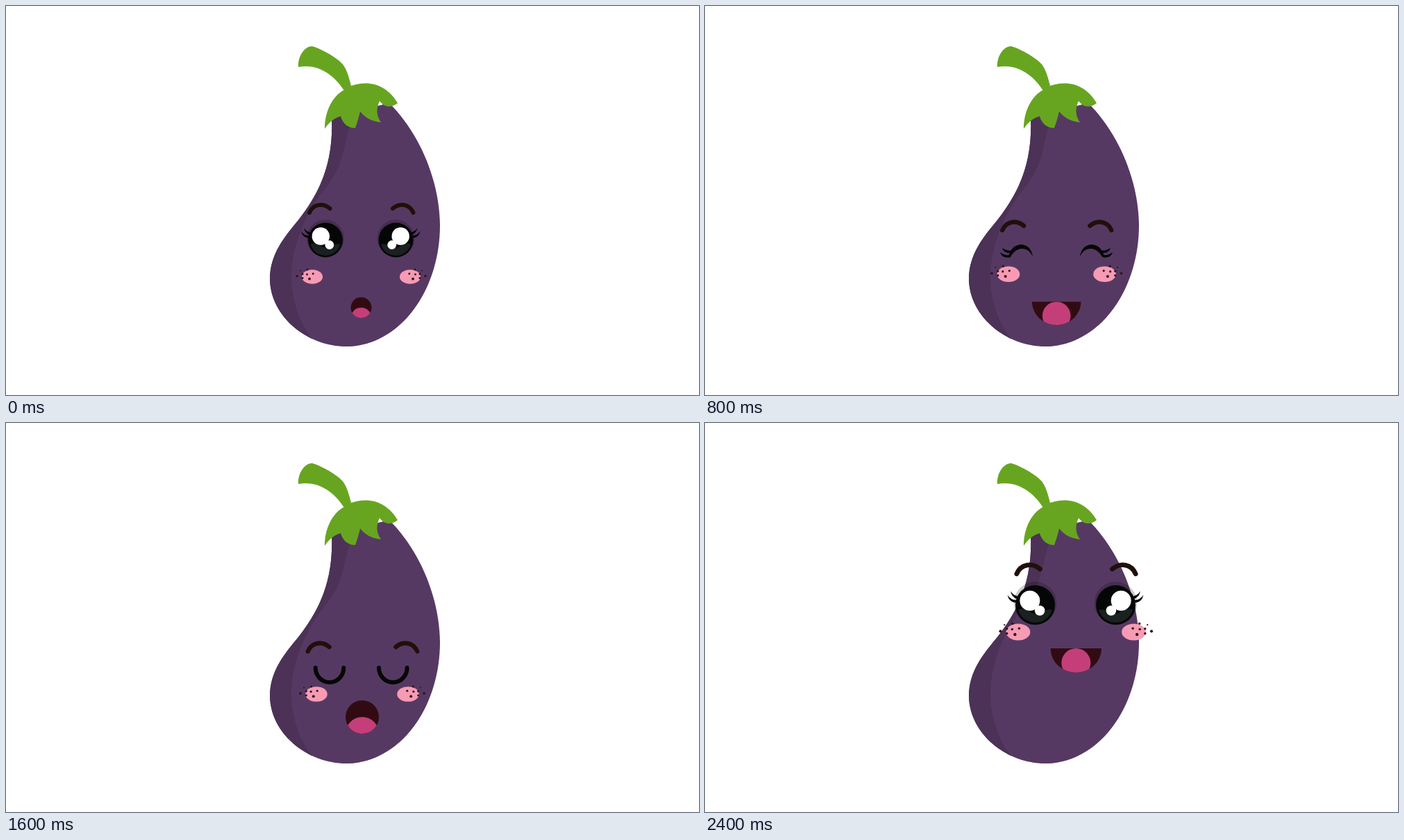
An HTML page for the animation above (2.8 s loop, 998 px wide and 561 px high).

```html
<!DOCTYPE html>
<html lang="en">
<head>
<meta charset="utf-8">
<title>Aubergine faces</title>
<style>
  html, body { margin: 0; width: 100%; height: 100%; overflow: hidden; background: #fff; }
  svg { display: block; width: 100%; height: 100%; }
</style>
</head>
<body>
<svg viewBox="0 0 998 561">
  <defs>
    <path id="body" d="M469 160C472 225 453 268 420 310C401 333 380 358 380 394C381 448 434 491 490 491C566 491 625 412 625 316C624 248 594 182 552 140Z"/>
    <clipPath id="bodyClip"><use href="#body"/></clipPath>

    <g id="lashes">
      <path id="lash" d="M-35 -13Q-33 -2 -21 -3L-22 -6Q-31 -6 -35 -13Z"/>
      <use href="#lash" x="4" y="-4.5"/>
    </g>
    <g id="eye">
      <circle cy="-2.5" r="27" opacity=".2"/>
      <use href="#lashes"/>
      <circle r="25" fill="#050706"/>
      <path d="M-21.5 6C-12 2 -8 10 0 11C8 13 12 4 21.5 6A22.3 22.3 0 0 1 -21.5 6Z" fill="#1b2021"/>
      <g fill="#fff"><circle cx="-6.7" cy="-5.5" r="12.7"/><circle cx="5.8" cy="7" r="6.4"/></g>
    </g>
    <g id="roundEye">
      <circle cx="1" cy="-5" r="32.5" opacity=".2"/>
      <use href="#lashes" transform="scale(1.22)"/>
      <circle r="31" fill="#050706"/>
      <path d="M-24 7C-15 4 -9 14 0 14C9 14 15 4 24 7C25 20 13 26 0 26C-13 26 -25 20 -24 7Z" fill="#1b2021"/>
      <g fill="#fff"><circle cx="-12.5" cy="-10.5" r="12"/><circle cx="4" cy="-6.5" r="3"/></g>
    </g>
    <g id="smileEye" fill="#050706">
      <path d="M-18 9C-14 -15 15 -15 17 9C11 -7 -7 -7 -15 9Z"/>
      <path id="smileLash" d="M-30 2Q-28 11 -16 9.500L-15 6Q-25 7 -30 2Z"/>
      <use href="#smileLash" x="3" y="-6.500"/>
    </g>
    <path id="sleepEye" d="M-20.300 0A20.300 21 0 0 0 20.300 0" fill="none" stroke="#050706" stroke-width="6" stroke-linecap="round"/>
    <path id="brow" d="M-15 7C-10 -5 4 -8 14.500 1" fill="none" stroke="#20100c" stroke-width="6" stroke-linecap="round"/>
    <g id="cheek">
      <ellipse rx="15" ry="10.300" fill="#f79bb4"/>
      <g fill="#33141c">
        <circle cx="-22" cy="-1" r="1.800"/><circle cx="-17" cy="-9" r="1"/>
        <circle cx="-7" cy="-10.500" r="1.500"/><circle cx="-14" cy="-4" r="1.500"/>
        <circle cx="-7.500" cy="-3.500" r="1.500"/><circle cx="1.200" cy="-4.500" r="1.500"/>
        <circle cx="-14" cy="1.700" r="1.500"/><circle cx="-4" cy="3" r="1.900"/>
      </g>
    </g>
  </defs>

  <use href="#body" fill="#563963"/>
  <path clip-path="url(#bodyClip)" fill="#4c3256" d="M497 150V170C484 202 490 226 459 264C432 298 411 345 411 392C412 426 422 456 441 480V500H370V150Z"/>
  <g fill="#67a520">
    <path d="M421 88C420 74 429 58 441 58C452 61 475 73 485 84C491 92 494 103 497 115L487 122C475 103 452 82 421 88Z"/>
    <path d="M459 177C459 152 470 130 487 121Q492 117 497 115C525 106 549 115 564 140C557 146 546 148 538 137C533 148 533 158 540 168C526 166 517 161 510 152Q508 162 503 176C493 176 485 170 482 159C473 161 465 168 459 177Z"/>
  </g>
  <g id="faces"></g>
</svg>
<script>
const STEP = 400;
const ORDER = [0, 1, 2, 0, 3, 4, 5];

const place = (part, x, y, scale = 1, side = 1) =>
  `<use href="#${part}" transform="translate(${x} ${y}) scale(${scale * side} ${scale})"/>`;

// The right part is the left one mirrored.
const pair = (part, left, right, y, scale = 1) =>
  place(part, left, y, scale) + place(part, right, y, scale, -1);

let mouthCount = 0;
function mouth(shape, x, y, rx, ry = rx) {
  const id = `mouth${mouthCount++}`;
  return `<clipPath id="${id}"><path d="${shape}"/></clipPath>
    <path d="${shape}" fill="#320b12"/>
    <ellipse cx="${x}" cy="${y}" rx="${rx}" ry="${ry}" fill="#c43f7a" clip-path="url(#${id})"/>`;
}

const roundMouth = (x, y, r) =>
  mouth(`M${x - r} ${y}a${r} ${r} 0 0 1 ${2 * r} 0a${r} ${r} 0 0 1 ${-2 * r} 0Z`, x, y + r, r);

const grin = (x, y, rx, ry, tongue) =>
  mouth(`M${x - rx} ${y}h${2 * rx}a${rx} ${ry} 0 0 1 ${-2 * rx} 0Z`, x, y + tongue, tongue);

const surprised =
  pair("eye", 460, 561.5, 337.5) + pair("brow", 452, 571.5, 291) +
  pair("cheek", 441, 582, 390.5) + roundMouth(511.5, 435, 15);

const winking =
  place("eye", 448, 343.5, 1.05) + pair("cheek", 432, 580, 388.3, 1.03) +
  `<path d="M585 318.500L542 344L585 363" fill="none" stroke="#050706" stroke-width="7" stroke-linecap="round"/>` +
  mouth("M480 405.500H533C541 405.500 544 410 543.500 416C542 434 526 447.500 506 447.500C486 447.500 470 434 469 416C468 409 472 405.500 480 405.500Z", 506, 434, 21);

const laughing =
  pair("smileEye", 455, 557, 353) + pair("brow", 444, 569.5, 316, 1.05) +
  pair("cheek", 437, 575.5, 386.7, 1.09) + grin(506.2, 426.5, 35.3, 33.5, 20.3);

const yawning =
  pair("sleepEye", 466, 557.3, 353) + pair("brow", 450.5, 576.5, 322, 1.05) +
  pair("cheek", 447, 579, 391, 1.05) + roundMouth(513, 424, 24);

const playful =
  pair("roundEye", 454, 579, 352) + pair("brow", 442, 592, 294, 1.25) +
  pair("cheek", 436, 598, 395, 1.23) +
  mouth("M499.500 429H534V447A17.250 17.250 0 0 1 499.500 447Z", 525, 450, 19, 18);

const happy =
  pair("eye", 475.5, 591.5, 262.5, 1.14) + pair("brow", 466, 603, 209.5, 1.14) +
  pair("cheek", 451, 617.5, 301.5, 1.16) + grin(534.3, 325, 36.7, 35, 21);

const faces = document.getElementById("faces");
faces.innerHTML = [surprised, winking, laughing, yawning, playful, happy]
  .map(face => `<g>${face}</g>`).join("");

function draw() {
  const current = ORDER[Math.floor(performance.now() / STEP) % ORDER.length];
  [...faces.children].forEach((face, i) => face.style.display = i === current ? "" : "none");
  requestAnimationFrame(draw);
}
draw();
</script>
</body>
</html>
```
